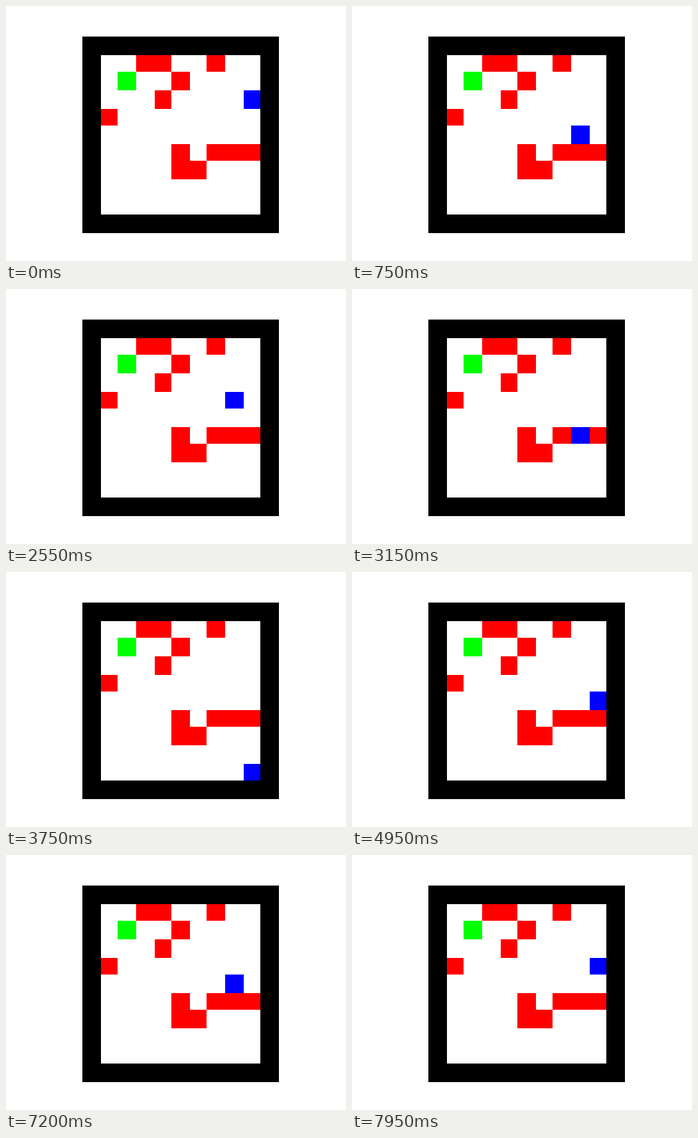
Recreate the animation shown at these times as an HTML page. Size 512x384 px, loop 8000 ms.

```html
<!DOCTYPE html>
<html>
<head>
<meta charset="utf-8">
<title>Grid walk</title>
<style>
html, body { margin: 0; width: 100%; height: 100%; overflow: hidden; background: #fff; }
svg { display: block; width: 100%; height: 100%; }
</style>
</head>
<body>
<svg viewBox="0 0 512 384" shape-rendering="crispEdges"></svg>
<script>
const LEFT = 115, TOP = 46, SIZE = 296, UNITS = 117;
const TICK = 150, LOOP = 8000;

// # wall, x hazard, G goal, A agent's start
const MAP = `
###########
#  xx  x  #
# G  x    #
#   x    A#
#x        #
#         #
#    x xxx#
#    xx   #
#         #
#         #
###########`.trim().split("\n");
const COLORS = { "#": "#000", x: "#f00", G: "#0f0", A: "#00f" };

// One letter per tick; a dot is a move blocked by the wall
const MOVES = "LDLRDR.LRLLLDRURUDLRDDDRD..UUDUUUDLDRU....UUDLRLDRU.U";
const STEP = { L: [-1, 0], R: [1, 0], U: [0, -1], D: [0, 1], ".": [0, 0] };

const svg = document.querySelector("svg");

// Cell borders snap to whole units before scaling to pixels
const edge = i => Math.round(Math.round(i * UNITS / MAP.length) * SIZE / UNITS);

function place(rect, [c, r]) {
  rect.setAttribute("x", LEFT + edge(c));
  rect.setAttribute("y", TOP + edge(r));
  rect.setAttribute("width", edge(c + 1) - edge(c));
  rect.setAttribute("height", edge(r + 1) - edge(r));
}

function addCell(color, cell) {
  const rect = document.createElementNS(svg.namespaceURI, "rect");
  rect.setAttribute("fill", color);
  place(rect, cell);
  svg.append(rect);
  return rect;
}

let start;
MAP.forEach((row, r) => [...row].forEach((mark, c) => {
  if (mark === "A") start = [c, r];
  else if (mark !== " ") addCell(COLORS[mark], [c, r]);
}));
const agent = addCell(COLORS.A, start);

const path = [start];
for (const move of MOVES) {
  const [c, r] = path[path.length - 1], [dc, dr] = STEP[move];
  path.push([c + dc, r + dr]);
}

function draw(t) {
  place(agent, path[Math.floor((t % LOOP) / TICK)]);
}

const begin = performance.now();
function frame() {
  draw(performance.now() - begin);
  requestAnimationFrame(frame);
}
frame();
</script>
</body>
</html>
```
